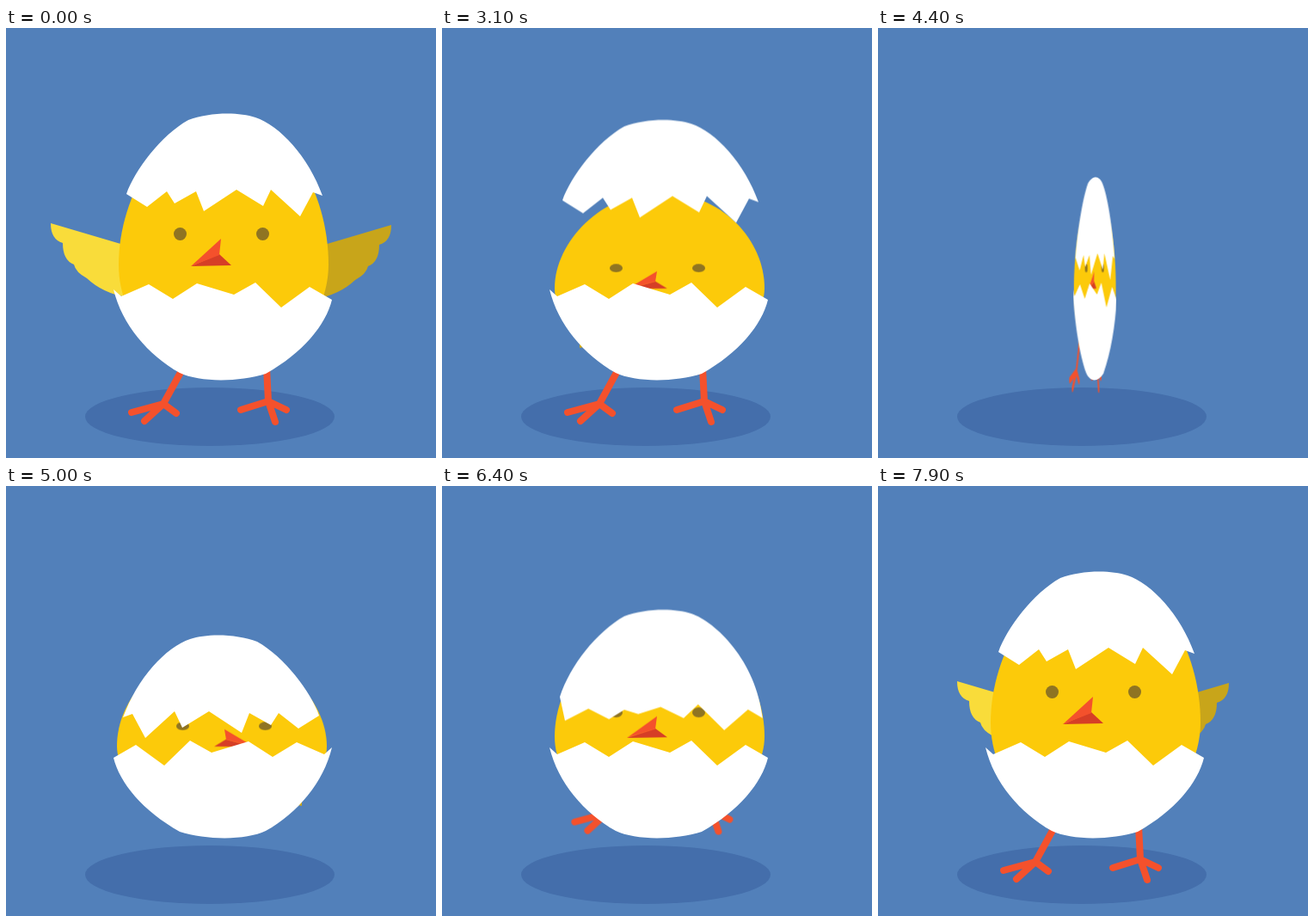
An HTML page for the animation above (8 s loop, 500 by 500 pixels).

```html
<!DOCTYPE html>
<html lang="en">
<head>
<meta charset="utf-8">
<title>Hatching chick</title>
<style>
  html, body { margin: 0; width: 100%; height: 100%; overflow: hidden; background: #5280ba; }
  svg { display: block; width: 100vw; height: 100vh; }

  /* every one-second segment advances in ten equal steps */
  .anim { animation: 8s steps(10) infinite; }

  .wing { animation-name: wing; }
  .eyes { animation-name: blink; transform-origin: 0 239.5px; }
  .bill { animation-name: chirp; transform-origin: 248px 264px; }
  .body { animation-name: duck; transform-origin: 0 353px; }
  .spin { animation-name: spin; transform-origin: 252px 0; }
  .legs { animation-name: legs; transform-origin: 235.5px 0; }
  .drop { animation-name: drop; }
  .cap  { animation-name: seal; }

  @keyframes wing {
    0%, 12.5% { transform: translate(0, 0); }
    25%, 75% { transform: translate(200px, 57px); }
    87.5% { transform: translate(0, 0); animation-timing-function: steps(5); }
    93.75% { transform: translate(200px, 0); animation-timing-function: steps(5); }
    100% { transform: translate(0, 0); }
  }
  @keyframes blink {
    0% { transform: scaleY(1); }
    12.5% { transform: scaleY(1); animation-timing-function: steps(5); }
    18.75% { transform: scaleY(0); animation-timing-function: steps(5); }
    25%, 100% { transform: scaleY(1); }
  }
  @keyframes chirp {
    0% { transform: rotate(0deg); }
    12.5% { transform: rotate(0deg); animation-timing-function: steps(5); }
    18.75% { transform: rotate(22deg); animation-timing-function: steps(5); }
    25%, 100% { transform: rotate(0deg); }
  }
  @keyframes duck {
    0%, 25% { transform: scaleY(1); }
    37.5%, 75% { transform: scaleY(.65); }
    87.5%, 100% { transform: scaleY(1); }
  }
  @keyframes drop {
    0%, 37.5% { transform: translateY(0); }
    50%, 75% { transform: translateY(74px); }
    87.5%, 100% { transform: translateY(0); }
  }
  @keyframes spin {
    0%, 50% { transform: scaleX(1); }
    62.5% { transform: scaleX(-1); }
    75%, 100% { transform: scaleX(1); }
  }
  @keyframes legs {
    0%, 50% { transform: translate(0, 0) scaleX(1); }
    62.5% { transform: translate(14px, -94px) scaleX(-1); }
    75% { transform: translate(14px, -94px) scaleX(1); }
    87.5%, 100% { transform: translate(0, 0) scaleX(1); }
  }
  /* the cracked edge closes onto the lower shell, then opens again */
  @keyframes seal {
    0%, 62.5%, 87.5%, 100% {
      d: path("M140 193C150 165 180 125 212 107C235 98 270 97 290 104C318 113 352 150 368 195L357 191L342 219L308 188L299 207L268 188L230 213L221 190L196 204L187 190L164 208Z");
    }
    75% {
      d: path("M135 206C148 164 180 125 212 107C235 98 270 97 290 104C318 114 374 164 376 246L355 232L319 253L291 224L269 238L245 229L227 226L206 233L193 242L159 231L129 242Z");
    }
  }
</style>
</head>
<body>
<svg viewBox="0 0 500 500">
  <defs>
    <path id="feathers" d="M52 227L140 253V313Q112 308 94 291Q81 284 79 275Q66 270 66 250Q52 246 52 227Z"/>
  </defs>

  <ellipse cx="237" cy="452" rx="145" ry="34" fill="#446eab"/>

  <g class="anim legs" fill="none" stroke="#f4512c" stroke-width="8" stroke-linecap="round" stroke-linejoin="round">
    <path d="M206 395L183 437M146 447L183 437L161 457M183 437L198 448"/>
    <path d="M303 395L305 434M273 444L305 434L313 458M305 434L326 444"/>
  </g>

  <g class="anim spin">
    <g class="anim wing" fill="#f9dc3a"><use href="#feathers"/></g>
    <g transform="translate(500 2) scale(-1 1)">
      <g class="anim wing" fill="#c8a51a"><use href="#feathers"/></g>
    </g>

    <g class="anim body">
      <path fill="#fcca0a" d="M253 104C326 104 375 190 375 275C375 340 320 400 253 400C187 400 131 345 131 275C131 193 186 104 253 104Z"/>
      <g class="anim eyes" fill="#8f7422">
        <circle cx="202.5" cy="239.5" r="7.5"/>
        <circle cx="298.5" cy="239.5" r="7.5"/>
      </g>
      <path fill="#d63e26" d="M215 277L248 263L262 276Z"/>
      <path class="anim bill" fill="#f4512c" d="M250 245L215 277L248 264Z"/>
    </g>

    <g class="anim drop">
      <path class="anim cap" fill="#fff" d="M140 193C150 165 180 125 212 107C235 98 270 97 290 104C318 113 352 150 368 195L357 191L342 219L308 188L299 207L268 188L230 213L221 190L196 204L187 190L164 208Z"/>
    </g>

    <path fill="#fff" d="M125 304L134 312L166 298L194 315L222 297L265 310L290 296L320 325L353 301L379 316C372 345 345 378 302 402C270 412 225 412 202 401C165 380 135 345 125 304Z"/>
  </g>
</svg>
</body>
</html>
```
